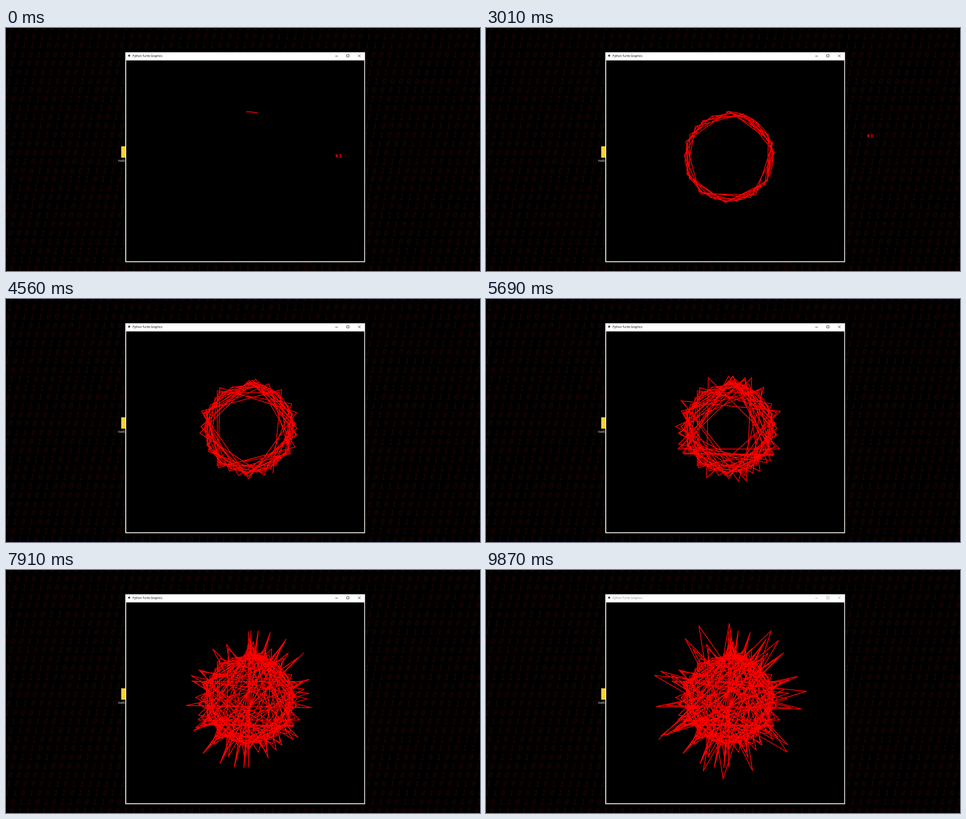
Recreate the animation shown at these times as an HTML page with a canvas. Size 1045 px wide and 536 px high, loop 9910 ms.

```html
<!DOCTYPE html>
<html>
<head>
<meta charset="utf-8">
<style>
html, body { margin: 0; width: 100%; height: 100%; overflow: hidden; background: #000; }
canvas { display: block; }
</style>
</head>
<body>
<canvas id="stage" width="1045" height="536"></canvas>
<script>
const W = 1045, H = 536, LOOP = 9910, SCALE = 0.55;
const stage = document.getElementById('stage').getContext('2d');

// Bursts of drawing: start ms, end ms, segments added
const bursts = [
  [30, 1010, 22], [1040, 2010, 24], [2070, 3040, 24], [3070, 4020, 25], [4080, 5050, 24],
  [5080, 6050, 24], [6110, 7100, 24], [7130, 8070, 22], [8130, 8700, 15]
];

function segmentsAt(t) {
  let count = 5;
  for (const [start, end, n] of bursts) {
    if (t < start) break;
    count += Math.min(n, Math.floor((t - start) / (end - start) * (n - 1) + 1.001));
  }
  return count;
}

// Turtle walk: forward 3k, then right k degrees
const points = [[529.8, 184.9]];
for (let k = 1, heading = 0; k < 210; k++) {
  const [x, y] = points[k - 1], a = heading * Math.PI / 180;
  points.push([x + 3 * k * SCALE * Math.cos(a), y + 3 * k * SCALE * Math.sin(a)]);
  heading = (heading + k) % 360;
}

function trace(c, list) {
  c.beginPath();
  list.forEach(([x, y]) => c.lineTo(x, y));
}

function makeBackdrop() {
  const canvas = document.createElement('canvas');
  canvas.width = W;
  canvas.height = H;
  const c = canvas.getContext('2d');
  c.fillRect(0, 0, W, H);

  // Dim slanted binary digits
  let seed = 7;
  const random = () => (seed = seed * 16807 % 2147483647) / 2147483647;
  c.font = 'italic bold 17px "DejaVu Sans Mono", monospace';
  c.textAlign = 'center';
  c.textBaseline = 'middle';
  c.fillStyle = '#180303';
  for (let row = 0; row < 28; row++) {
    for (let col = -1; col < 60; col++) {
      c.fillText(random() < 0.55 ? '0' : '1', col * 18 + 12 - row * 4 % 18, 1 + row * 19.7);
    }
  }

  // Desktop icon, partly behind the window
  c.fillStyle = '#f5cf3c';
  c.fillRect(254, 261, 25, 25);
  c.fillStyle = '#fff';
  c.font = '6.2px "Open Sans", sans-serif';
  c.textAlign = 'left';
  c.textBaseline = 'alphabetic';
  c.fillText('loads', 247, 295.3);

  // Window frame
  c.fillStyle = '#f4f4f0';
  c.fillRect(263, 53.5, 528.5, 463);
  c.fillStyle = '#fff';
  c.fillRect(264, 54, 527, 17.5);
  c.fillStyle = '#000';
  c.fillRect(265, 71.5, 524.7, 443);
  c.fillStyle = '#24405c';
  c.fillRect(269.5, 59, 4, 4);
  return canvas;
}

function drawTitle(active) {
  const c = stage;
  c.fillStyle = c.strokeStyle = active ? '#000' : '#8c8c8c';
  c.font = '6.2px "Open Sans", sans-serif';
  c.fillText('Python Turtle Graphics', 279, 63.8);
  c.lineWidth = 0.8;
  c.strokeRect(751.4, 59, 4.8, 4.8);
  c.beginPath();
  c.moveTo(726.3, 62); c.lineTo(731.6, 62);
  c.moveTo(776.5, 59); c.lineTo(781.5, 64);
  c.moveTo(781.5, 59); c.lineTo(776.5, 64);
  c.stroke();
}

const ease = (t, start, end) => {
  const u = Math.max(0, Math.min(1, (t - start) / (end - start)));
  return u * u * (3 - 2 * u);
};

function drawCursor(t) {
  const arrive = ease(t, 100, 800), leave = ease(t, 3250, 3850);
  if (leave === 1) return;
  const c = stage;
  c.save();
  c.translate(727 + 114 * arrive + 14 * leave, 277 - 44 * arrive + 310 * leave);
  c.fillStyle = '#e00000';
  trace(c, [[0, 0], [0, 8.2], [1.8, 6.6], [3.3, 9.6], [4.5, 9], [3.2, 6.2], [5.6, 6]]);
  c.fill();
  c.fillStyle = '#b80000';
  trace(c, [[7.8, 1.2], [12.5, 1.2], [12.5, 2.3], [10.8, 5], [12.5, 7.8], [12.5, 9],
    [7.8, 9], [7.8, 7.8], [9.5, 5], [7.8, 2.3]]);
  c.fill();
  c.restore();
}

const backdrop = makeBackdrop();

function draw(now) {
  const t = now % LOOP;
  stage.drawImage(backdrop, 0, 0);
  drawTitle(t < 9870);
  stage.strokeStyle = '#f00';
  stage.lineWidth = 1.7;
  stage.lineCap = stage.lineJoin = 'round';
  trace(stage, points.slice(0, segmentsAt(t) + 1));
  stage.stroke();
  drawCursor(t);
}

const origin = performance.now();
function tick() {
  draw(performance.now() - origin);
  requestAnimationFrame(tick);
}
tick();
</script>
</body>
</html>
```
